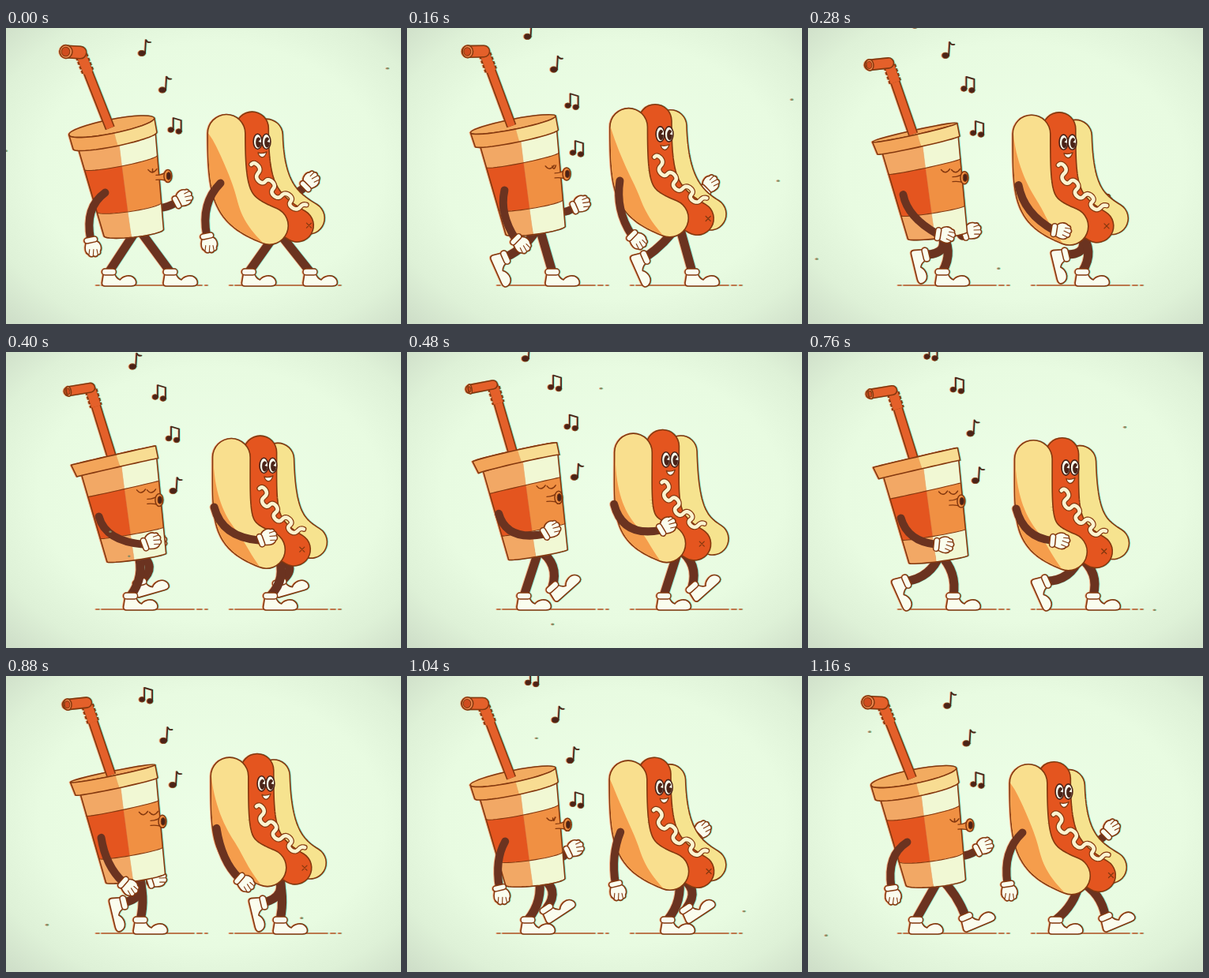
An HTML page for the animation above (1.2 s loop, 500x375 px).

```html
<!DOCTYPE html>
<html lang="en">
<head>
<meta charset="utf-8">
<title>Walking snacks</title>
<style>
html, body { margin: 0; width: 100%; height: 100%; overflow: hidden; background: #e6fae0; }
svg { display: block; width: 100vw; height: 100vh; }
#scene { filter: drop-shadow(1px .7px 0 rgba(70,222,200,.55)) drop-shadow(-.8px 0 0 rgba(255,100,40,.5)); }
</style>
</head>
<body>
<svg viewBox="0 0 500 375" stroke-linecap="round" stroke-linejoin="round">
  <defs>
    <radialGradient id="paper" cx="52%" cy="48%" r="72%">
      <stop offset="0" stop-color="#ecfee6"/>
      <stop offset=".6" stop-color="#e8fbe1"/>
      <stop offset=".82" stop-color="#def1d7"/>
      <stop offset="1" stop-color="#cfdfc9"/>
    </radialGradient>
  </defs>
  <rect width="500" height="375" fill="url(#paper)"/>
  <g id="scene"></g>
</svg>
<script>
const LOOP = 1200, STEP = 40, STANCE = 640, BEAT = 400, TAU = 2 * Math.PI;
const INK = '#84380f', DARK = '#4a2318', LIMB = '#6b3320', WHITE = '#fafdee';
const RED = '#e4551f', ORANGE = '#f09043', PEACH = '#f2a865', CREAM = '#f1f8d4';
const BUN = '#f9df8e', PALE = '#f6e38f', TAN = '#f59d4c';
const scene = document.getElementById('scene');

const { sin, cos, max, min, hypot, atan2, PI } = Math;
const r = v => Math.round(v * 100) / 100;
const xy = p => r(p[0]) + ' ' + r(p[1]);
const add = (p, x, y) => [p[0] + x, p[1] + y];
const mix = (a, b, u) => a + (b - a) * u;
const mixPt = (a, b, u) => [mix(a[0], b[0], u), mix(a[1], b[1], u)];
const angle = (a, b) => atan2(b[1] - a[1], b[0] - a[0]) * 180 / PI;
const sample = (n, f) => Array.from({ length: n + 1 }, (_, i) => f(i / n));
const polyline = pts => 'M' + pts.map(xy).join('L');

const shape = (d, fill, line = INK, w = 1.6) =>
  `<path d="${d}" fill="${fill}" stroke="${line}" stroke-width="${w}"/>`;
const stroke = (d, color, w, extra = '') =>
  `<path d="${d}" fill="none" stroke="${color}" stroke-width="${r(w)}" ${extra}/>`;
const tube = (d, color, w, extra) => stroke(d, INK, w + 3.2, extra) + stroke(d, color, w, extra);
const oval = (x, y, rx, ry, fill, line = INK, w = 1.5) =>
  `<ellipse cx="${r(x)}" cy="${r(y)}" rx="${r(rx)}" ry="${r(ry)}" fill="${fill}" stroke="${line}" stroke-width="${w}"/>`;
const place = (p, turn, body) => `<g transform="translate(${xy(p)}) rotate(${r(turn)})">${body}</g>`;
const cuff = (x, y, w, h) =>
  `<rect x="${x}" y="${y}" width="${w}" height="${h}" rx="${min(w, h) / 2}" fill="${WHITE}" stroke="${INK}" stroke-width="1.5"/>`;

const GLOVE = shape('M3-7C7-12 14-12 17-9Q21-9 21-5Q24-2 21 1Q23 5 18 7Q14 12 3 7Z', WHITE)
  + stroke('M13-1L20 1M12 4L18 6M14-5L20-5', INK, 1.1) + cuff(-3, -8.5, 7, 17);
const SHOE = shape('M-7 2L-9 14Q-9 18-5 18L28 18Q36 18 34 11Q31 4 23 5Q17 6 14 10Q9 8 7 2Z', WHITE)
  + cuff(-9, -4, 18, 8);

// Everything swings once per loop (turn) and bobs on the beat
function poseAt(t) {
  const a = TAU * (t + 20) / LOOP, turn = cos(a), side = sin(a);
  const fore = (1 - turn) / 2, back = max(0, turn) ** 2, drop = min(1, 1 - turn) ** 2;
  const mover = peak => {
    const bob = cos(TAU * (t - peak) / BEAT);
    return (x, y, dx, dy, lift) => [x + dx * turn, y + dy * turn + lift * bob];
  };
  const cup = mover(310), dog = mover(335);
  return {
    turn,
    open: 3 + 6 * turn,
    lidL: cup(81.5, 139.5, -1.8, -5, 5.5),
    lidR: cup(188.8, 116.5, -1, -3, 4.5),
    rimL: cup(88, 155.5, -3, -3, 5),
    rimR: cup(192, 133, -1, -1.5, 4.5),
    baseL: cup(126.5, 264.5, -2.5, -1.5, 3),
    baseR: cup(201.5, 254.5, -2, 0, 4.5),
    tip: cup(78, 41.5, -2, -12.5, 6),
    elbow: cup(102, 39, -8, -9, 6),
    mouth: cup(198, 187, 7, 0, 3),
    lids: cup(180.5, 177, 5, 3, 4),
    shoulder: cup(120.5, 208, 5, 0, 3.5),
    bend: [126 - 27 * back, 240 - 13 * back],
    wrist: [138 - 32 * turn + 9 * (1 - cos(2 * a)) + 8 * side, 268 - 45 * fore ** 2.7],
    hand: 80 - 110 * fore - 16 * side,
    farWrist: [190 + 25 * turn + 8 * side, 221 + 40 * drop + 30 * min(0, turn)],
    dogFar: [358 + 20 * turn + 9 * side, 201 + 28 * drop],
    bunTop: dog(283, 130.5, -4, 0, 5.5),
    bunEnd: dog(331, 247, 2.5, 0, 6.5),
    dogTop: dog(318, 123.5, -6.5, 0, 6.5),
    dogEnd: dog(366, 247, 2.5, 0, 6),
    backTop: dog(339, 131.5, -9, 0, 8),
    backEnd: dog(385, 239, -2, 0, 3.5)
  };
}

// Slides back on the ground, then kicks up and swings forward
function footAt(phase) {
  if (phase < STANCE) {
    const q = phase / STANCE;
    return { x: 208 - 84 * q - 3 * sin(TAU * q), y: 309, tilt: 0 };
  }
  const q = (phase - STANCE) / (LOOP - STANCE), roll = sin(TAU * q ** 1.3);
  return {
    x: 124 + 84 * q ** 1.4 - 9 * sin(PI * min(1, 2.3 * q)),
    y: 309 - 22 * sin(PI * q ** .75),
    tilt: roll * (roll > 0 ? 88 : 42)
  };
}

function leg(hip, phase, shift) {
  const f = footAt(phase % LOOP), foot = [f.x + shift, f.y];
  const dx = foot[0] - hip[0], dy = foot[1] - hip[1], d = hypot(dx, dy);
  const k = 1.1 * Math.sqrt(max(0, 30.5 ** 2 - d * d / 4)) / d;
  const knee = add(mixPt(hip, foot, .5), dy * k, -dx * k);
  return stroke(`M${xy(hip)}Q${xy(knee)} ${xy(foot)}`, LIMB, 11) + place(foot, f.tilt, SHOE);
}
const legs = (hip, t, shift) => leg(hip, t + LOOP / 2, shift) + leg(hip, t, shift);

const arm = (from, via, to, turn) =>
  stroke(`M${xy(from)}Q${xy(via)} ${xy(to)}`, LIMB, 10) + place(to, turn, GLOVE);

// Curved wall: u runs across, f runs down
function wallOf(tl, tr, bl, br, sagTop, sagEnd) {
  return (u, f) => add(mixPt(mixPt(tl, bl, f), mixPt(tr, br, f), u), 0,
    mix(sagTop, sagEnd, f) * 2 * Math.sqrt(max(0, u * (1 - u))));
}
function banded(wall, rows, split) {
  const row = (f, from, to) => sample(20, i => wall(mix(from, to, (1 - cos(PI * i)) / 2), f));
  const patch = (a, b, side, fill) => {
    const span = f => side ? row(f, split(f), 1) : row(f, 0, split(f));
    return shape(polyline(span(a).concat(span(b).reverse())) + 'Z', fill, fill, .4);
  };
  let out = '';
  for (const [a, b, left, right] of rows) out += patch(a, b, 1, right) + patch(a, b, 0, left);
  for (const [a] of rows.slice(1)) out += stroke(polyline(row(a, 0, 1)), INK, 1.1);
  return out + shape(polyline(row(0, 0, 1).concat(row(1, 0, 1).reverse())) + 'Z', 'none');
}

function straw(p, end) {
  const flat = 'stroke-linecap="butt"', color = '#e4602a';
  const wide = 11.5 + 2.5 * p.turn, tipW = 5 + 3 * p.turn;
  const ribs = polyline([mixPt(p.elbow, end, .04), mixPt(p.elbow, end, .27)]);
  return tube(polyline([p.elbow, end]), color, 9.5, flat)
    + stroke(ribs, INK, 16, flat + ' stroke-dasharray="4 2"')
    + stroke(ribs, color, 12, flat)
    + tube(polyline([p.tip, p.elbow]), color, wide)
    + place(p.tip, angle(p.tip, p.elbow),
      oval(0, 0, tipW, wide / 2 + 1.4, '#f08a50') + oval(-.5, 0, tipW * .66, wide / 2 - 1.2, '#d04c1e', INK, 1));
}

function cupFace(p) {
  const [mx, my] = p.mouth, [ex, ey] = p.lids, away = 1 - max(0, p.turn);
  const lash = (x, w) => `M${r(x - w)} ${r(ey - 1)}q${r(w)} 7 ${r(2 * w)} -1`;
  const snout = `M${r(mx - 15)} ${r(my - 1)}Q${r(mx - 6)} ${r(my - 1)} ${r(mx)} ${r(my - 7)}v14Q${r(mx - 6)} ${r(my + 4)} ${r(mx - 15)} ${r(my + 5)}`;
  return stroke(lash(ex - 6.5 * away, 5.5) + lash(ex + 6.5 * away, 5.5 * away), INK, 1.5)
    + shape(snout, ORANGE, INK, 1.3)
    + oval(mx, my, 5, 8, ORANGE) + oval(mx + 1, my, 2.8, 4.8, DARK, INK, 1);
}

function cup(p, t) {
  const hip = [167, (p.baseL[1] + p.baseR[1]) / 2 - 6];
  const body = wallOf(add(p.rimL, 6, -2), add(p.rimR, -2, -2), p.baseL, p.baseR, p.open * .5, 3 + p.open * .3);
  const lid = wallOf(p.lidL, p.lidR, p.rimL, p.rimR, p.open, p.open * .8);
  const mid = mixPt(p.lidL, p.lidR, .5);
  const half = hypot(p.lidR[0] - p.lidL[0], p.lidR[1] - p.lidL[1]) / 2;
  return arm([180, 222], [193, p.farWrist[1] + 13], p.farWrist, -18 - 10 * p.turn)
    + legs(hip, t, 0)
    + banded(body, [[0, .25, PEACH, CREAM], [.25, .73, RED, ORANGE], [.73, 1, PEACH, CREAM]], f => mix(.53, .46, f))
    + place(mid, angle(p.lidL, p.lidR), oval(0, 0, half, Math.abs(p.open), '#f2ab60'))
    + straw(p, add(mid, -2, 2))
    + banded(lid, [[0, 1, '#f3a55a', '#f8dc92']], () => .53)
    + cupFace(p)
    + arm(p.shoulder, p.bend, p.wrist, p.hand);
}

// Point on a cubic curve from a to b, with its normal on the outer side
function curve(a, b, c1, c2) {
  const p1 = add(a, ...c1), p2 = add(b, ...c2);
  const at = u => {
    const q = mixPt(p1, p2, u);
    return mixPt(mixPt(mixPt(a, p1, u), q, u), mixPt(q, mixPt(p2, b, u), u), u);
  };
  return (u, out = 0) => {
    const [x0, y0] = at(u - .01), [x1, y1] = at(u + .01), d = hypot(x1 - x0, y1 - y0);
    return add(at(u), -(y1 - y0) / d * out, (x1 - x0) / d * out);
  };
}
const along = f => polyline(sample(30, u => f(u)));

function sauce(a, b) {
  const dir = mixPt([0, 0], [b[0] - a[0], b[1] - a[1]], 1 / hypot(b[0] - a[0], b[1] - a[1]));
  const line = polyline(sample(70, u => {
    const w = TAU * 3.2 * u, wave = 6 * sin(w), slip = -2 * sin(2 * w), bow = 6 * sin(PI * u);
    return add(mixPt(a, b, u), dir[1] * (wave - bow) + dir[0] * slip, -dir[0] * (wave - bow) + dir[1] * slip);
  }));
  return stroke(line, INK, 7) + stroke(line, '#fbf3d0', 4.6);
}

function dogFace(p) {
  const [ex, ey] = add(p.dogTop, 11 + 1.5 * p.turn, 17);
  const eye = x => oval(x, ey, 5.4, 9.6, WHITE, DARK, 1.6) + oval(x + 1, ey + 1, 3.2, 6.4, DARK, DARK, .5)
    + `<path d="M${r(x + 1)} ${r(ey)}l3.5-4v5z" fill="${WHITE}"/>`;
  return eye(ex - 5.5) + eye(ex + 5.5)
    + place([ex, ey + 15], 0, shape('M-5-1Q0 1 6-2Q4 5 0 5Q-4 4-5-1Z', WHITE, INK, 1.3));
}

function hotdog(p, t) {
  const back = along(curve(p.backTop, p.backEnd, [2, 70], [-28, -17]));
  const meat = along(curve(p.dogTop, p.dogEnd, [0, 74], [-46, -27]));
  const bun = curve(p.bunTop, p.bunEnd, [0, 82], [-47, -19]);
  const depth = u => (23 + 4 * p.turn) * sin(PI * u ** (1.3 - .5 * p.turn));
  const shade = sample(30, u => bun(u, 23)).concat(sample(30, u => bun(1 - u, 23 - depth(1 - u))));
  const shift = q => add(q, 147, -5);
  return arm([352, 215], [368, p.dogFar[1] + 10], p.dogFar, -45)
    + legs([344, p.bunEnd[1] + 7], t, 177)
    + tube(back, PALE, 39)
    + tube(meat, RED, 40)
    + dogFace(p)
    + sauce(add(p.dogTop, -1, 46), add(p.dogEnd, 9, -21))
    + place(add(p.dogEnd, 12 + 3 * p.turn, 0), 0, stroke('M-3-3l6 6m0-6l-6 6', INK, 1.3))
    + tube(along(bun), BUN, 46)
    + shape(polyline(shade) + 'Z', TAN, 'none', 0)
    + arm(add(p.shoulder, 146, -12), shift(p.bend), shift(p.wrist), p.hand);
}

const SINGLE = oval(-3, 11, 4.4, 3.6, DARK, INK, .8) + stroke('M1 11L2-6Q4-2 8-3', DARK, 1.7);
const DOUBLE = oval(-5, 6, 3.6, 3.3, DARK, INK, .8) + oval(5, 8, 3.6, 3.3, DARK, INK, .8)
  + stroke('M-2 6L-2-9L8-6L8 8', DARK, 1.7);

function notes(t) {
  return [DOUBLE, DOUBLE, SINGLE, SINGLE].map((note, i) => {
    const age = (t - 300 * i + 270 + LOOP) % LOOP - 270;
    const x = 215 - .000075 * (age + 130) ** 2, y = 123 - .2 * age + .00005 * age * age;
    return place([x, y], 0, note);
  }).join('');
}

const ground = x => stroke(`M${x} 326h4m3 0h117m4 0h6m4 0h3`, '#c15d30', 1.5);

// A little dust that flickers with the film
function dust(t) {
  const rand = k => { const v = sin(t * 1.37 + k * 78.2) * 4375.5; return v - Math.floor(v); };
  return [0, 2].map(k => oval(rand(k) * 500, rand(k + 1) * 375, 1.7, 1.2, '#8a8a62', 'none', 0)).join('');
}

function draw(t) {
  const p = poseAt(t);
  scene.innerHTML = ground(114) + ground(283) + cup(p, t) + hotdog(p, t) + notes(t) + dust(t);
}

const start = performance.now();
let shown = -1;
function tick() {
  const t = Math.floor(((performance.now() - start) % LOOP) / STEP) * STEP;
  if (t !== shown) draw(shown = t);
  requestAnimationFrame(tick);
}
tick();
</script>
</body>
</html>
```
